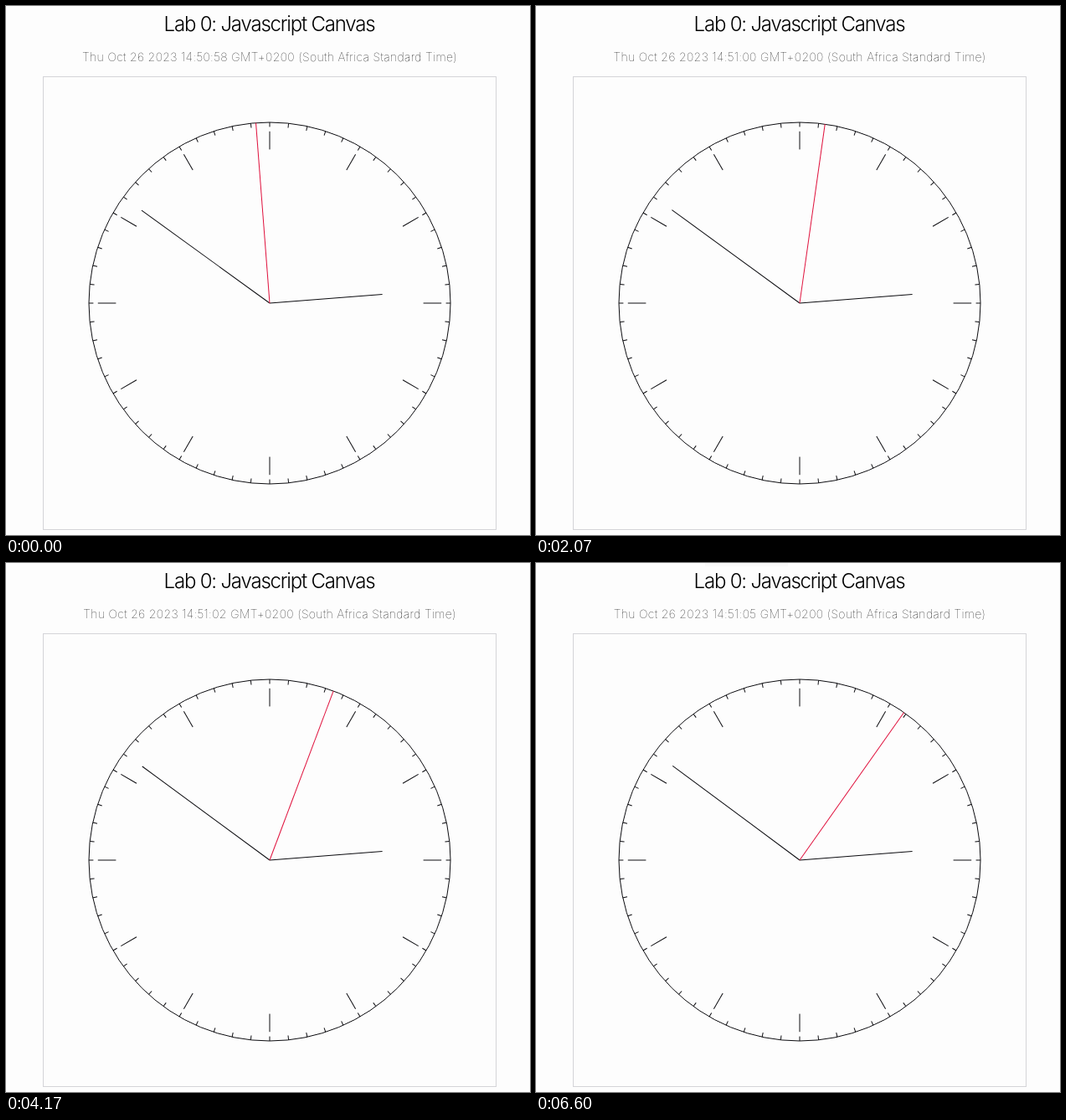
Animation, 626 px wide and 632 px high, one loop 6630 ms. Source, as an HTML page:

```html
<!DOCTYPE html>
<html lang="en">
<head>
<meta charset="utf-8">
<title>Canvas clock</title>
<style>
  html, body { margin: 0; width: 100%; height: 100%; overflow: hidden; background: #fdfdfd; }
  svg { display: block; width: 626px; height: 632px; }
  text { font-family: Inter, "Open Sans", sans-serif; text-anchor: middle; fill: #000; }
  .title { font-size: 24px; font-weight: 300; letter-spacing: -.05em; }
  .date { font-size: 14px; font-weight: 100; letter-spacing: .025em; }
  .face { fill: none; stroke: #0c0c10; stroke-width: 1; }
  .frame { fill: none; stroke: #d4d4d8; }
  .second { stroke: #e0103c; }
</style>
</head>
<body>
<svg viewBox="0 0 626 632">
  <rect id="glow" x="202" y="0" width="99" height="4" fill="#f8f8f8"/>
  <text class="title" x="314.5" y="30">Lab 0: Javascript Canvas</text>
  <text class="date" id="date" x="315" y="66"></text>
  <rect class="frame" x="44.5" y="84.5" width="541" height="541"/>
  <g class="face" id="face" transform="translate(315 355)">
    <circle r="216"/>
  </g>
</svg>
<script>
  const LOOP = 6630;
  const RADIUS = 216;
  const HAND_START = 50 * 60 + 59.27;  // seconds past 14:00 shown by the hands
  const TEXT_START = 50 * 60 + 58.5;   // seconds past 14:00 shown by the label
  const GLOW_START = 4500;

  const $ = id => document.getElementById(id);
  const face = $('face');

  function addLine(from, to, angle = 0, cls = '') {
    const line = document.createElementNS('http://www.w3.org/2000/svg', 'line');
    line.setAttribute('y1', -from * RADIUS);
    line.setAttribute('y2', -to * RADIUS);
    if (cls) line.setAttribute('class', cls);
    turn(line, angle);
    face.append(line);
    return line;
  }

  function turn(line, angle) {
    line.setAttribute('transform', `rotate(${angle})`);
  }

  for (let i = 0; i < 60; i++) {
    addLine(0.975, 1, i * 6);
    if (i % 5 === 0) addLine(0.85, 0.95, i * 6);
  }

  const hour = addLine(0, 0.625);
  const minute = addLine(0, 0.875);
  const second = addLine(0, 1, 0, 'second');

  const pad = n => String(n).padStart(2, '0');

  function label(total) {
    const s = Math.floor(total);
    return `Thu Oct 26 2023 14:${pad(Math.floor(s / 60))}:${pad(s % 60)} GMT+0200 (South Africa Standard Time)`;
  }

  function draw(ms) {
    const s = HAND_START + ms / 1000;
    turn(second, (s % 60) * 6);
    turn(minute, s / 10);
    turn(hour, 60 + s / 120);
    const text = label(TEXT_START + ms / 1000);
    if ($('date').textContent !== text) $('date').textContent = text;
    $('glow').style.visibility = ms >= GLOW_START ? 'visible' : 'hidden';
  }

  const start = performance.now();
  function tick() {
    draw((performance.now() - start) % LOOP);
    requestAnimationFrame(tick);
  }
  draw(0);
  requestAnimationFrame(tick);
</script>
</body>
</html>
```
